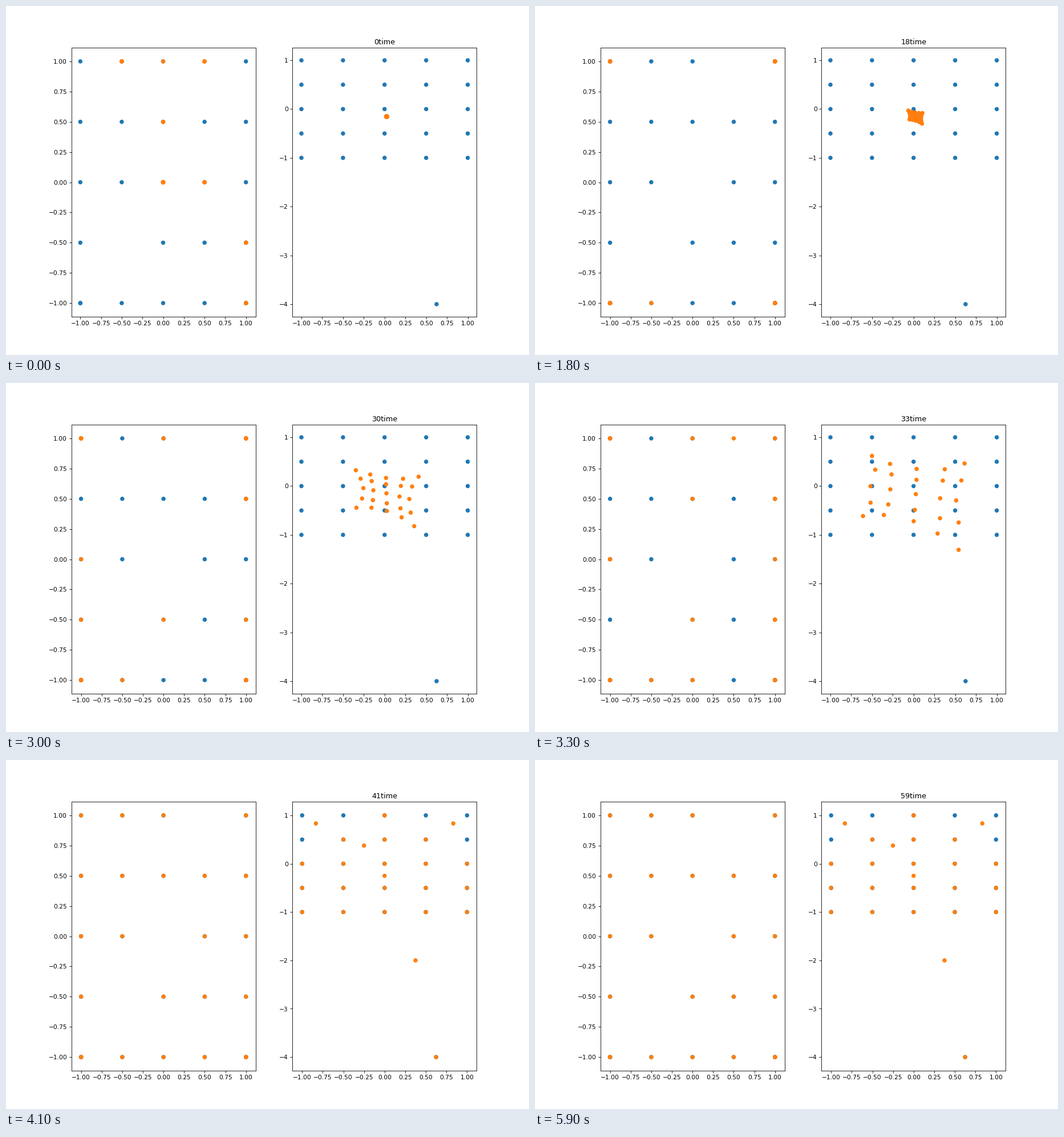
These frames come from a looping animation (917x611 px, 6 s). A matplotlib script:

```python
import matplotlib.pyplot as plt
import numpy as np
from matplotlib.animation import FuncAnimation

W, H, DPI = 917, 611, 76.4
STEPS, COOLING = 60, 40
SIGMA_MAX, SIGMA_MIN = 3.0, 0.05
BLUE, ORANGE = "tab:blue", "tab:orange"

# Self-organising map: a 5x5 latent grid fitted to a square of points and an outlier.
axis = np.linspace(-1, 1, 5)
nodes = np.array([(u, v) for v in axis for u in axis])
data = np.array([(x, y) for y in axis for x in axis] + [(0.625, -4)])
mirror = nodes * (1, -1)

# Node numbers run row by row from the lower left.
OPENING = [4, 9, 13, 12, 17, 23, 22, 21]
CORNERS = [4, 0, 20, 22, 24]


def distance(a, b):
    return np.linalg.norm(a[:, None] - b[None], axis=-1)


def nearest(points):
    return distance(data, points).argmin(1)


def mirrored_start(ids):
    return np.array(ids)[nearest(mirror[ids])]


def sigma(t):
    return max(SIGMA_MIN, SIGMA_MAX - (SIGMA_MAX - SIGMA_MIN) * t / COOLING)


def smooth(win, s):
    """Kernel average of the data around each node."""
    k = np.exp(-distance(nodes, nodes[win]) / (2 * s * s))
    return k @ data / k.sum(1, keepdims=True)


def train():
    history = [(mirrored_start(OPENING), data.mean(0) + 0.005 * mirror)]
    win = mirrored_start(CORNERS)
    for t in range(1, STEPS):
        fit = smooth(win, sigma(t))
        win = nearest(fit)
        history.append((win, fit))
    return history


history = train()
latent = nodes[history[-1][0]]

fig, (left, right) = plt.subplots(
    1, 2, figsize=((W + 0.01) / DPI, (H + 0.01) / DPI), dpi=DPI)
fig.subplots_adjust(left=0.125, right=0.9, bottom=0.11, top=0.88, wspace=0.2)
quarters = np.linspace(-1, 1, 9)
left.set_xticks(quarters)
left.set_yticks(quarters)
right.set_xticks(quarters)
right.set_yticks(range(-4, 2))


def dots(ax, points, color):
    # One size per dot keeps the dots at subpixel positions.
    return ax.scatter(*points.T, s=np.full(len(points), 36), color=color)


dots(left, latent, BLUE)
dots(right, data, BLUE)
left_dots = dots(left, latent, ORANGE)
right_dots = dots(right, nodes, ORANGE)
title = right.set_title("0time")

# Marker radius as a share of the axes width and height.
RADIUS = np.array((3 / (1200 * 0.775 / 2.2), 3 / (800 * 0.77)))


def fit_limits(ax, base, moving):
    """Autoscale around both point sets, marker size included, with a 5% margin."""
    low, high = base.min(0) - RADIUS, base.max(0) + RADIUS
    r = RADIUS * (high - low) * 1.1
    low = np.minimum(low, moving.min(0) - r)
    high = np.maximum(high, moving.max(0) + r)
    pad = 0.05 * (high - low)
    ax.set_xlim(low[0] - pad[0], high[0] + pad[0])
    ax.set_ylim(low[1] - pad[1], high[1] + pad[1])


def draw(t):
    win, fit = history[t]
    left_dots.set_offsets(nodes[win])
    right_dots.set_offsets(fit)
    fit_limits(left, latent, nodes[win])
    fit_limits(right, data, fit)
    title.set_text(f"{t}time")
    return left_dots, right_dots, title


anim = FuncAnimation(fig, draw, frames=STEPS, interval=100, repeat=True, repeat_delay=0,
                     init_func=lambda: draw(0), blit=False)
plt.show()
```
